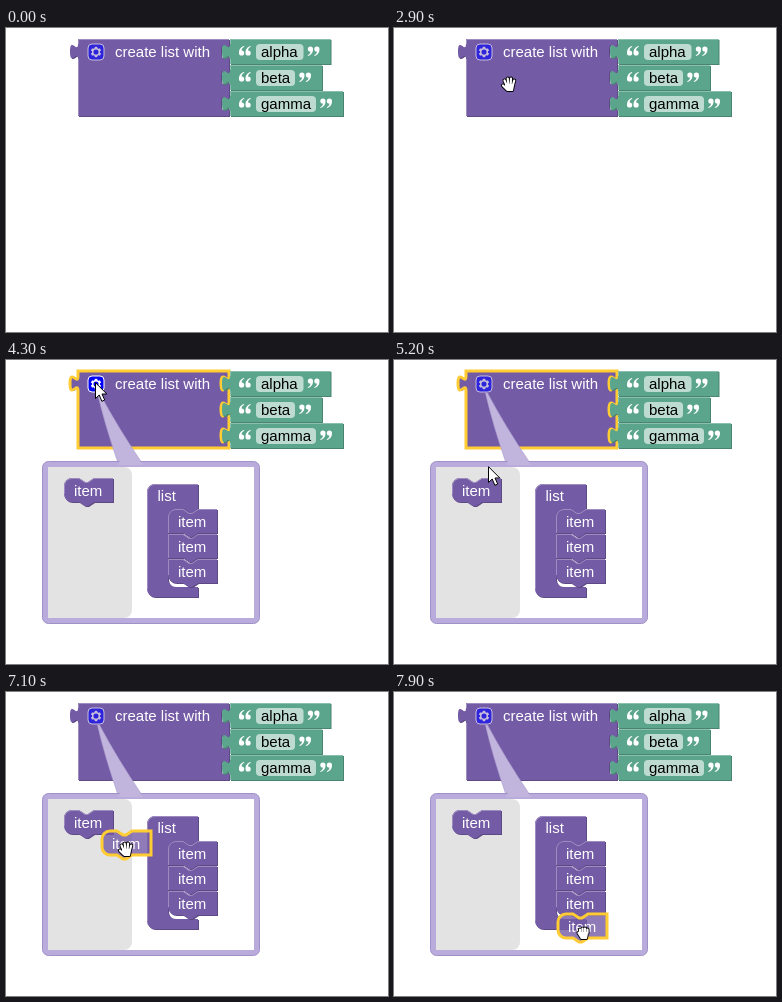
An HTML page for the animation above (8 s loop, 382 by 304 pixels).

```html
<!DOCTYPE html>
<html lang="en">
<head>
<meta charset="utf-8">
<title>List block</title>
<style>
  html, body { margin: 0; width: 100%; height: 100%; overflow: hidden; background: #fff; }
  svg { display: block; width: 382px; height: 304px; }
  text { font: 15px "Liberation Sans", Arial, sans-serif; fill: #fff; }
  .light, .ring { fill: none; }
  .ring { stroke: #fc3; stroke-width: 3; display: none; }
  .selected > .ring { display: inline; }
  .selected > .light { display: none; }
  .dragged > .dark { display: none; }
  .dragged > .body { fill-opacity: .8; }
</style>
</head>
<body>
<svg id="stage" viewBox="0 0 382 304"></svg>
<script>
const NS = 'http://www.w3.org/2000/svg';
const stage = document.getElementById('stage');
const PURPLE = { body: '#745ba5', dark: '#5d4984', light: '#9e8cc0' };
const GREEN = { body: '#5ba58c', dark: '#498470', light: '#8cc0ae' };
const SOCKET = 'v5c0 10-8-8-8 7.5s8-2.5 8 7.5';
const TAB = 'V20c0-10-8 8-8-7.5s8 2.5 8-7.5';

function add(parent, tag, attrs = {}, text) {
  const el = document.createElementNS(NS, tag);
  for (const key in attrs) el.setAttribute(key, attrs[key]);
  if (text) el.textContent = text;
  parent.append(el);
  return el;
}

const moveTo = (el, x, y) => el.setAttribute('transform', `translate(${x} ${y})`);
const show = (el, on) => { el.style.display = on ? '' : 'none'; };

function group(parent, x = 0, y = 0) {
  const g = add(parent, 'g');
  moveTo(g, x, y);
  return g;
}

function block(parent, x, y, d, edge, color) {
  const g = group(parent, x, y);
  add(g, 'path', { class: 'dark', d, fill: color.dark, transform: 'translate(1 1)' });
  add(g, 'path', { class: 'body', d, fill: color.body });
  add(g, 'path', { class: 'light', d: edge, stroke: color.light });
  add(g, 'path', { class: 'ring', d });
  return g;
}

function quote(parent, x, y, turn) {
  const g = add(parent, 'g', { fill: '#fff', transform: `translate(${x} ${y}) rotate(${turn})` });
  for (const dx of [-6, .5])
    add(g, 'path', { d: `M${dx + 5} -5C${dx + 1} -3.5 ${dx} -1 ${dx} 2A2.6 2.6 0 1 0 ${dx + 2.6} -.6C${dx + 2.6} -2.4 ${dx + 3.5} -3.4 ${dx + 5.3} -4.3Z` });
}

function stringBlock(y, word, fieldWidth) {
  const w = fieldWidth + 53;
  const g = block(stage, 224, y, `M0 0H${w}V25H0${TAB}z`, `M.5 5V.5H${w}M.5 25V20`, GREEN);
  quote(g, 15, 12, 0);
  add(g, 'rect', { x: 26, y: 5, width: fieldWidth, height: 16, rx: 4, fill: '#bddbd1' });
  add(g, 'text', { x: 31, y: 18, style: 'fill:#000' }, word);
  quote(g, fieldWidth + 36, 12, 180);
}

function item(parent, x, y, roundTop = true, roundEnd = true) {
  const top = roundTop ? 'M0 8A8 8 0 0 1 8 0' : 'M0 0';
  const end = roundEnd ? 'H8A8 8 0 0 1 0 16' : 'H0';
  const notch = 'H15l6 4h3l6-4H49';
  const g = block(parent, x, y, `${top}${notch}V24H30l-6 4h-3l-6-4${end}z`,
    `M.5 ${roundEnd ? 16 : 24}V8${roundTop ? 'A7.5 7.5 0 0 1 8 .5' : 'V.5'}H15l6 4h3l6-4H49`, PURPLE);
  add(g, 'text', { x: 10, y: 17.5 }, 'item');
  return g;
}

// Main block
const main = block(stage, 72, 11, `M0 0H151${SOCKET}v6${SOCKET}v6${SOCKET}V77H0${TAB}z`,
  'M.5 5V.5H151M.5 77V20', PURPLE);
add(main, 'text', { x: 37, y: 18 }, 'create list with');
const icon = group(main, 18, 13);
add(icon, 'rect', { x: -8, y: -8, width: 16, height: 16, rx: 4, fill: '#00f', stroke: '#fff' });
for (let a = 0; a < 360; a += 60)
  add(icon, 'rect', { x: -1.3, y: -5.2, width: 2.6, height: 3, fill: '#fff', transform: `rotate(${a})` });
add(icon, 'circle', { r: 3.3, fill: '#00f', stroke: '#fff', 'stroke-width': 1.5 });

stringBlock(11, 'alpha', 47.5);
stringBlock(37, 'beta', 39);
stringBlock(63, 'gamma', 60);

// Editor bubble
const bubble = group(stage);
add(bubble, 'path', { d: 'M91.5 33Q98 62 112 103H136Q111 66 93.5 33z', fill: '#c1b5de', stroke: '#ab9dcd', 'stroke-width': .6 });
add(bubble, 'rect', { x: 36.5, y: 101.5, width: 217, height: 162, rx: 6, fill: '#b9abdb', stroke: '#a091c8' });
add(bubble, 'path', { d: 'M114 101H134L137 105H112z', fill: '#c1b5de' });
add(bubble, 'rect', { x: 42, y: 107, width: 206, height: 151, fill: '#fff' });
add(bubble, 'path', { d: 'M42 107H118a8 8 0 0 1 8 8V250a8 8 0 0 1-8 8H42z', fill: '#e3e3e3' });
const list = block(bubble, 141, 124,
  'M8 0H51V25l-6 4h-3l-6-4H29a8 8 0 0 0-8 8V95a8 8 0 0 0 8 8H51V113H8a8 8 0 0 1-8-8V8a8 8 0 0 1 8-8z',
  'M.5 105V8A7.5 7.5 0 0 1 8 .5H51', PURPLE);
add(list, 'text', { x: 10.5, y: 17 }, 'list');
for (let i = 0; i < 3; i++) item(bubble, 162, 149 + 25 * i, i === 0, i === 2);
const spare = item(bubble, 58, 118);
const dragged = item(bubble, 58, 118);
dragged.classList.add('selected', 'dragged');

// Pointers
const arrow = group(stage);
add(arrow, 'path', { d: 'M.5 .7V16.5L4.2 13 6.9 19.3 9.7 18 7 12H11.8z', fill: '#fff', stroke: '#000' });

function hand(fingers) {
  const g = group(stage);
  const d = fingers + 'M5 9H12L11 14H6.5z';
  const line = { d, 'stroke-linecap': 'round', 'stroke-linejoin': 'round' };
  add(g, 'path', { ...line, fill: '#000', stroke: '#000', 'stroke-width': 4 });
  add(g, 'path', { ...line, fill: '#fff', stroke: '#fff', 'stroke-width': 2.2 });
  return g;
}
const openHand = hand('M3.5 4.5L5.5 9M6.7 2.5L7.3 8M10 2.5L9.7 8M13.2 4.5L12 9M2 9.5L6 13.5');
const fist = hand('M5 5.5V9M7.5 4.5V8M10 4.5V8M12.5 5.5V9M3.5 9L6 13');

// [ms, x, y] of the pointer's hot spot
const path = [
  [1200, 374, 191], [1800, 232, 130], [2100, 232, 130], [2900, 115, 56], [3000, 106, 49],
  [3300, 87, 20], [3700, 87, 20], [3800, 89, 21.5], [4600, 89, 21.5], [5200, 94, 106],
  [5500, 94, 143], [6000, 82, 136], [6700, 82, 136], [7100, 120, 157], [7600, 162, 208],
  [7900, 188, 240]
];

function pointAt(t) {
  const i = path.findIndex(p => p[0] >= t);
  if (i <= 0) return path[i < 0 ? path.length - 1 : 0].slice(1);
  const [a, b] = [path[i - 1], path[i]];
  const k = (t - a[0]) / (b[0] - a[0]);
  return [1, 2].map(n => Math.round(a[n] + (b[n] - a[n]) * k));
}

const within = (t, from, to) => t >= from && t < to;

function draw(ms) {
  const t = Math.floor(ms / 100) * 100;
  const [x, y] = pointAt(t);
  const closed = t >= 7700;
  const open = within(t, 2600, 3300) || within(t, 5600, 7700);
  show(arrow, t >= 1200 && !open && !closed);
  show(openHand, open);
  show(fist, closed);
  moveTo(arrow, x, y);
  moveTo(openHand, x - 8, y - 8);
  moveTo(fist, x - 7, y - 8);

  icon.setAttribute('opacity', within(t, 3300, 4800) ? 1 : .6);
  main.classList.toggle('selected', within(t, 4000, 6800));
  show(bubble, t >= 4100);
  spare.classList.toggle('selected', within(t, 5300, 6800));
  show(dragged, t >= 6800);
  moveTo(dragged, 58 + x - 82, 118 + y - 136);
}

const start = performance.now();
function tick() {
  draw((performance.now() - start) % 8000);
  requestAnimationFrame(tick);
}
draw(0);
requestAnimationFrame(tick);
</script>
</body>
</html>
```
